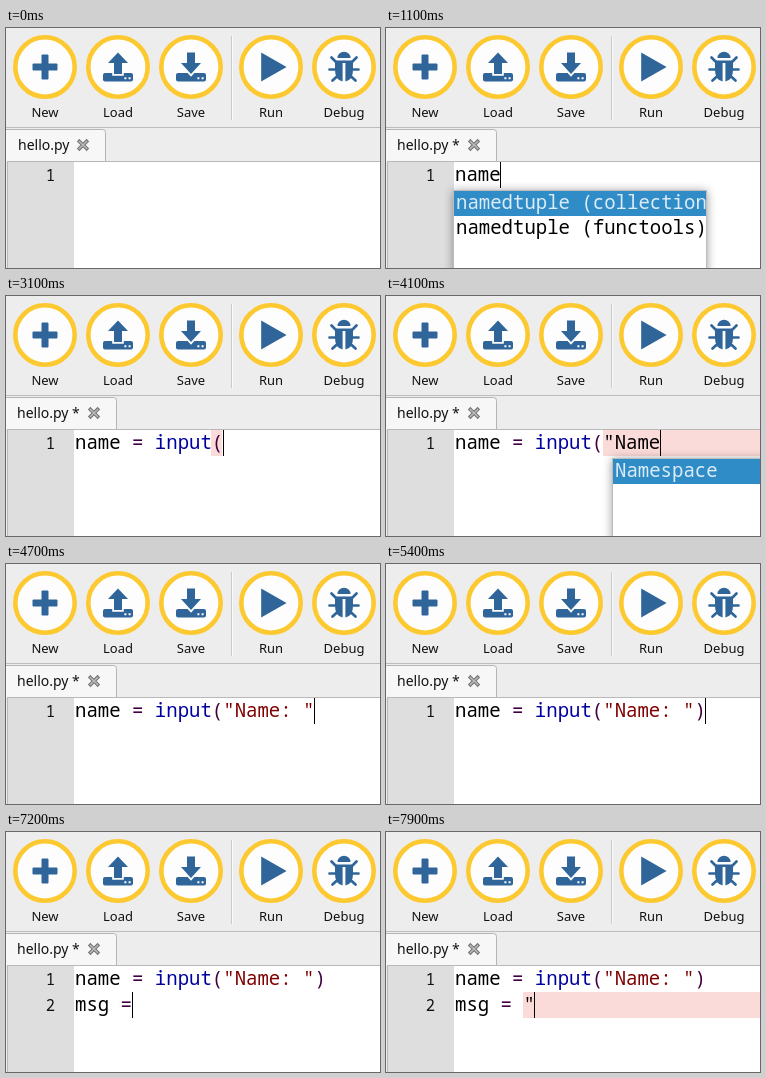
These frames come from a looping animation (374 by 240 pixels, 8000 ms). An HTML page:

```html
<!DOCTYPE html>
<html lang="en">
<head>
<meta charset="utf-8">
<title>Code editor typing</title>
<style>
  html, body { margin: 0; width: 100%; height: 100%; overflow: hidden; background: #ededed; }
  svg { display: block; }
  text { white-space: pre; }
  .ui { font: 13px "Noto Sans", "Open Sans", sans-serif; fill: #111; text-anchor: middle; }
  .tab { font: 14px "Noto Sans", "Open Sans", sans-serif; fill: #111; }
  .code { font: 19px "Noto Sans Mono", "DejaVu Sans Mono", monospace; fill: #000; }
  .num { font: 15.5px "Noto Sans Mono", "DejaVu Sans Mono", monospace; fill: #111; text-anchor: end; }
  .builtin { fill: #0000a0; }
  .op { fill: #400040; }
  .str { fill: #800000; }
  .ring { fill: #fdfdfd; stroke: #fdc931; stroke-width: 4.6; }
  .icon { fill: #30659a; }
  .arrow { fill: #30659a; stroke: #fdfdfd; stroke-width: 3.6; paint-order: stroke; }
  .legs { fill: none; stroke: #30659a; stroke-width: 2.7; stroke-linecap: round; }
  .bad { fill: #fbdbd9; }
  #shade { filter: drop-shadow(0 1px 5px rgba(0, 0, 0, .4)); }
</style>
</head>
<body>
<svg width="374" height="240" viewBox="0 0 374 240">
  <defs>
    <circle id="ring" class="ring" r="29.7"/>
    <g id="tray">
      <rect class="icon" x="-15" y="6" width="30" height="8.6" rx="2"/>
      <path d="M6.4 11.2h2M10.6 11.2h2" stroke="#fdfdfd" stroke-width="2"/>
    </g>
  </defs>

  <rect width="374" height="240" fill="#ededed"/>
  <path d="M225.5 8V92" stroke="#cacaca"/>
  <path d="M226.5 8V92" stroke="#fafafa"/>

  <g transform="translate(39 39)">
    <use href="#ring"/>
    <path class="icon" stroke="#30659a" stroke-linejoin="round" d="M-3-12H3V-3H12V3H3V12H-3V3H-12V-3H-3Z"/>
    <text class="ui" y="50">New</text>
  </g>
  <g transform="translate(112 39)">
    <use href="#ring"/><use href="#tray"/>
    <path class="arrow" d="M0-14.5L10-4H4V7H-4V-4H-10Z"/>
    <text class="ui" y="50">Load</text>
  </g>
  <g transform="translate(185 39)">
    <use href="#ring"/><use href="#tray"/>
    <path class="arrow" d="M-4-14.5H4V-4H10L0 7L-10-4H-4Z"/>
    <text class="ui" y="50">Save</text>
  </g>
  <g transform="translate(265 39)">
    <use href="#ring"/>
    <path class="icon" d="M-9.8-14.5L15.6 0L-9.8 14.5Z"/>
    <text class="ui" y="50">Run</text>
  </g>
  <g transform="translate(338 39)">
    <use href="#ring"/>
    <path class="legs" d="M-8-5L-12.5-9.5M8-5L12.5-9.5M-8 2.5H-14.5M8 2.5H14.5M-6 8.5L-11.5 13.5M6 8.5L11.5 13.5"/>
    <path class="icon" d="M-6.5-9A6.5 6.2 0 0 1 6.5-9ZM-9-6.5H9V3Q9 13 1.4 14.5V-4H-1.4V14.5Q-9 13-9 3Z"/>
    <text class="ui" y="50">Debug</text>
  </g>

  <path d="M0 99.5H374" stroke="#bcbcbc"/>
  <path id="tab" fill="#f7f7f7" stroke="#b4b4b4"/>
  <text id="title" class="tab" y="122"></text>
  <g id="close">
    <path d="M-3.6-3.6L3.6 3.6M3.6-3.6L-3.6 3.6" stroke="#777" stroke-width="3.6" stroke-linecap="square"/>
    <path d="M-3.6-3.6L3.6 3.6M3.6-3.6L-3.6 3.6" stroke="#bbb" stroke-width="1.4" stroke-linecap="square"/>
  </g>

  <rect x="1" y="133" width="373" height="107" fill="#fff"/>
  <rect x="1" y="133" width="67" height="107" fill="#dedede"/>
  <path d="M1.5 133V240M1 133.5H374" fill="none" stroke="#b8b8b8"/>
  <text class="num" x="49" y="153">1</text>
  <text id="second" class="num" x="49" y="179">2</text>

  <rect id="bad" class="bad" height="26"/>
  <text id="row0" class="code" x="69" y="153"></text>
  <text id="row1" class="code" x="69" y="179"></text>

  <g id="popup">
    <rect id="shade" y="162.5" height="120" fill="#fff" stroke="#bdbdbd"/>
    <svg id="list" y="163" height="77">
      <rect width="100%" height="25" fill="#308cc6"/>
      <text id="item0" class="code" x="2" y="18" style="fill:#dcebf8"></text>
      <text id="item1" class="code" x="2" y="43"></text>
    </svg>
  </g>
  <rect id="caret" width="1" height="26" fill="#000"/>
</svg>

<script>
const LOOP = 8000, CHAR = 11.4, LEFT = 69, TOP = 134, ROW = 26;
const SCRIPT = 'name = input("Name: ")\nmsg = "';
// Moment of each key press, in tenths of a second
const KEYS = [3, 5, 7, 9, 12, 15, 17, 19, 22, 24, 26, 27, 29, 32, 34, 35, 37, 39,
  42, 44, 46, 51, 56, 59, 62, 64, 67, 70, 73, 76];

const $ = id => document.getElementById(id);
const set = (id, attrs) => {
  for (const k in attrs) $(id).setAttribute(k, attrs[k]);
};
const show = (id, on) => set(id, { visibility: on ? 'visible' : 'hidden' });

function paint(src) {
  return src.replace(/"[^"]*"|\binput\b|[=()]/g, s => {
    const kind = s[0] === '"' ? 'str' : s === 'input' ? 'builtin' : 'op';
    return `<tspan class="${kind}">${s}</tspan>`;
  });
}

// Suggestions for the word at the end of the line
function suggest(line) {
  const tuples = ['namedtuple (collections)', 'namedtuple (functools)'];
  if (line === 'nam') return { x: 67, w: 298, items: tuples };
  if (line === 'name') return { x: 67, w: 254, items: tuples };
  if (/"Name?$/.test(line)) return { x: 226, w: 220, items: ['Namespace', ''] };
  return null;
}

function drawTab(dirty) {
  const right = dirty ? 110.5 : 99.5;
  set('tab', { d: `M-1 134V101.5H${right - 3}Q${right} 101.5 ${right} 104.5V134` });
  set('title', { x: dirty ? 11 : 12 });
  $('title').textContent = dirty ? 'hello.py *' : 'hello.py';
  set('close', { transform: `translate(${dirty ? 88 : 77} 117)` });
}

function drawPopup(line) {
  const p = suggest(line);
  show('popup', p);
  if (!p) return;
  set('shade', { x: p.x + .5, width: p.w - 1 });
  set('list', { x: p.x + 1, width: p.w - 2 });
  p.items.forEach((s, i) => $('item' + i).textContent = s);
}

function drawBad(line, y) {
  const open = line.split('"').length === 2;
  const brace = line.endsWith('(');
  const col = open ? line.indexOf('"') : line.length - 1;
  const x = Math.floor(LEFT + Math.max(col, 0) * CHAR);
  show('bad', open || brace);
  set('bad', { x, y, width: open ? 374 - x : 11 });
}

let last = -1;
function render(now) {
  const t = now % LOOP;
  const n = KEYS.filter(k => k * 100 <= t).length;
  if (n !== last) {
    last = n;
    const lines = SCRIPT.slice(0, n).split('\n');
    const row = lines.length - 1, line = lines[row], y = TOP + row * ROW;
    $('row0').innerHTML = paint(lines[0]);
    $('row1').innerHTML = paint(lines[1] || '');
    show('second', row > 0);
    drawTab(n > 0);
    drawBad(line, y);
    drawPopup(line);
    show('caret', n > 0);
    set('caret', { x: Math.floor(LEFT + line.length * CHAR), y });
  }
  requestAnimationFrame(render);
}
render(performance.now());
</script>
</body>
</html>
```
